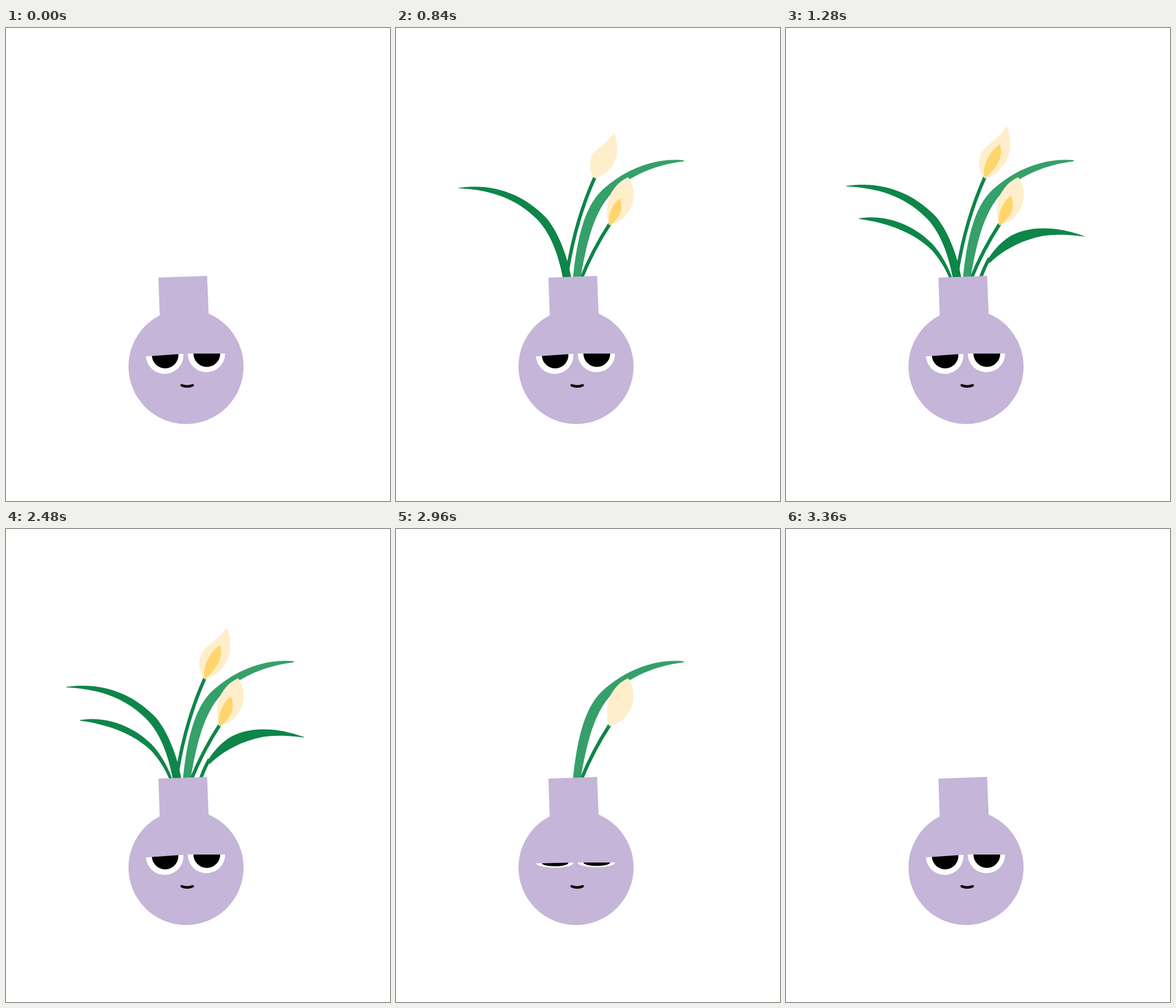
These frames come from a looping animation (674 by 830 pixels, 3.6 s). An HTML page:

```html
<!DOCTYPE html>
<html lang="en">
<head>
<meta charset="utf-8">
<title>Sleepy vase</title>
<style>
  html, body { margin: 0; width: 100%; height: 100%; overflow: hidden; background: #fff; }
  svg { display: block; width: 100%; height: 100%; }
  .stem { fill: none; stroke: #0e8549; stroke-width: 6; }
  .leaf { fill: #0e8549; }
  .light { fill: #35a069; }
  .petal { fill: #ffeecb; }
  .heart { fill: #ffd56c; }
  .vase { fill: #c5b5d8; }
</style>
</head>
<body>
<svg viewBox="0 0 674 830">
  <path id="leftLow" class="leaf" d="M128 334C180 325 230 350 258 380C273 397 286 420 294 445H289C281 423 270 406 256 390C226 360 180 342 128 335Z"/>
  <path id="backStem" class="stem" d="M301 425Q316 335 349 262"/>
  <path id="leftHigh" class="leaf" d="M106 277C185 266 236 302 264 332C284 356 302 400 309 445H294C286 400 272 360 247 334C216 303 175 281 106 278Z"/>
  <path id="backPetal" class="petal" d="M388 172C394 190 397 212 389 228C382 246 366 260 349 264C338 252 336 232 344 217C352 204 368 200 388 172Z"/>
  <path id="backHeart" class="heart" d="M375 204C380 214 377 230 370 240C364 250 356 258 349 263C346 256 347 244 353 231C358 219 366 211 375 204Z"/>
  <path id="rightStem" class="stem" d="M341 440Q348 420 357 404"/>
  <path id="rightBlade" class="leaf" d="M523 365C470 346 420 347 388 369C372 381 362 393 352 410L358 412C383 388 415 372 450 365C475 361 500 363 523 366Z"/>
  <path id="frontStem" class="stem" d="M325 440Q345 390 375 344"/>
  <path id="lightLeaf" class="light" d="M310 445C318 360 334 306 368 279C404 248 455 227 505 232V234C462 239 424 254 396 275C352 305 336 365 323 445Z"/>
  <path id="frontPetal" class="petal" d="M407.5 262C417 272 423 300 408 323C400 336 387 343 374 346C369 328 368 302 380 286C389 272 398 266 407.5 262Z"/>
  <path id="frontHeart" class="heart" d="M395 294C400 306 399 318 393 328C388 336 381 343 375 346C372 336 373 325 380 312C385 302 390 297 395 294Z"/>

  <g class="vase">
    <path d="M267.5 438L353 435L356 510H270Z"/>
    <circle cx="316" cy="594" r="101"/>
  </g>
  <g id="eyes">
    <g transform="rotate(-4 278.5 574)">
      <path fill="#fff" d="M245.5 574A33 33 0 0 0 311.5 574Z"/>
      <path d="M256 574A23.3 23.3 0 0 0 302.6 574Z"/>
    </g>
    <path fill="#fff" d="M319 571.2A32.8 32.8 0 0 0 384.6 571.2Z"/>
    <path d="M329 571.2A23.5 23.5 0 0 0 376 571.2Z"/>
  </g>
  <path d="M308.5 627Q318 631 327.5 627" fill="none" stroke="#000" stroke-width="4.5" stroke-linecap="round"/>
</svg>
<script>
  const LOOP = 3600, STEP = 40, TURN = 1800, MIRROR = 3700;

  // id: [start ms, duration ms, pivot x, pivot y]
  const parts = {
    lightLeaf:  [345, 200, 317, 450],
    frontStem:  [400, 130, 325, 445],
    frontPetal: [470, 130, 375, 346],
    frontHeart: [738, 190, 375, 346],
    leftHigh:   [745, 130, 301, 450],
    backStem:   [745,  90, 301, 437],
    backPetal:  [800,  80, 349, 264],
    backHeart:  [880, 180, 349, 264],
    rightStem:  [960, 110, 341, 442],
    rightBlade: [1065, 145, 358, 411],
    leftLow:    [1108, 145, 290, 449]
  };
  const blinks = [480, 2960];

  const byId = id => document.getElementById(id);
  const clamp = v => Math.min(1, Math.max(0, v));
  const easeOut = p => 1 - (1 - p) ** 3;

  function scaleAbout(el, x, y, sx, sy) {
    el.setAttribute('transform', `translate(${x} ${y}) scale(${sx} ${sy}) translate(${-x} ${-y})`);
  }

  function draw(t) {
    // The plant shrinks back along the same path it grew.
    const grown = t < TURN ? t : MIRROR - t;
    for (const [id, [start, duration, x, y]] of Object.entries(parts)) {
      const size = easeOut(clamp((grown - start) / duration));
      const el = byId(id);
      el.style.display = size > 0 ? '' : 'none';
      scaleAbout(el, x, y, size, size);
    }
    const shut = Math.max(...blinks.map(at => clamp(1 - Math.abs(t - at) / 80)));
    scaleAbout(byId('eyes'), 316, 590, 1, 1 - 0.75 * shut);
  }

  const begin = performance.now();
  function tick() {
    const t = (performance.now() - begin) % LOOP;
    draw(Math.floor(t / STEP) * STEP);
    requestAnimationFrame(tick);
  }
  tick();
</script>
</body>
</html>
```
